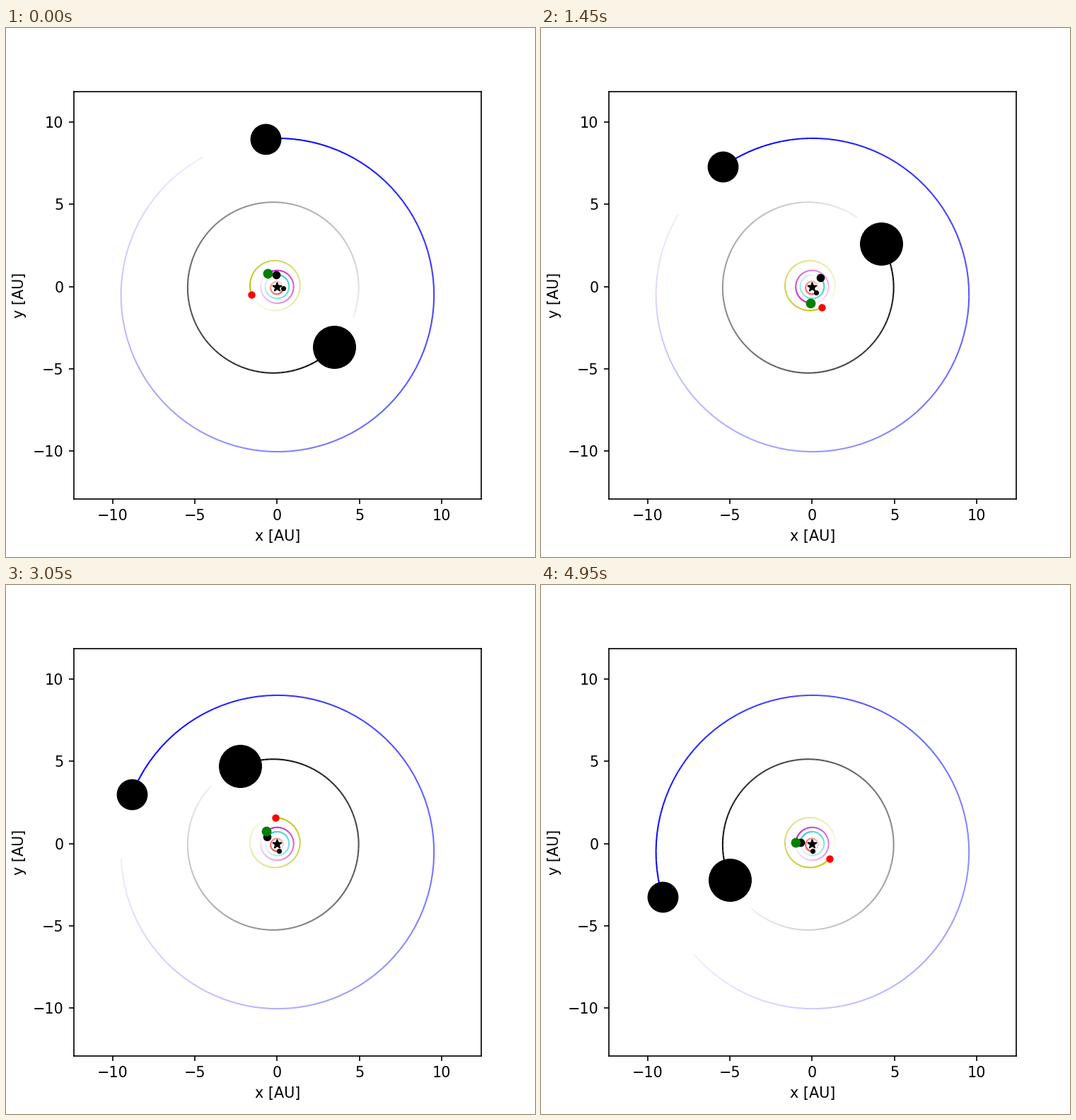
Write a matplotlib script that moves like this. It is 748 px wide and 748 px high and loops after 5 s.

```python
import numpy as np
import matplotlib.pyplot as plt
from matplotlib.animation import FuncAnimation
from matplotlib.collections import LineCollection
from matplotlib.colors import to_rgb

DPI = 149.6
FRAMES, INTERVAL = 100, 50
STEP_DAYS = 30
EARTH_RATE = np.radians(0.985608)    # mean motion per day at 1 AU
TAIL = 0.067                         # faintest part of the trail still drawn
TRAIL_POINTS = 100


class Planet:
    """Ellipse around the star: size, eccentricity, perihelion, first longitude."""

    def __init__(self, ax, a, e, peri, lon, trail, dot, diameter):
        self.a, self.e = a, e
        self.peri = np.radians(peri)
        self.start = np.radians(lon - peri)
        self.rate = EARTH_RATE / a ** 1.5    # Kepler's third law
        alpha = np.linspace(TAIL, 1, TRAIL_POINTS - 1)
        colors = [(*to_rgb(trail), f) for f in alpha]
        self.line = LineCollection([], colors=colors, linewidths=1, zorder=2)
        ax.add_collection(self.line, autolim=False)
        self.marker = ax.scatter([0], [0], s=(diameter * 72 / DPI) ** 2,
                                 color=dot, linewidths=0, zorder=3)

    def eccentric(self, day):
        """Solve Kepler's equation by Newton's method."""
        mean = self.start + self.rate * day
        ecc = mean + self.e * np.sin(mean)
        for _ in range(5):
            ecc -= (ecc - self.e * np.sin(ecc) - mean) / (1 - self.e * np.cos(ecc))
        return ecc

    def points(self, ecc):
        u = self.a * (np.cos(ecc) - self.e)
        v = self.a * np.sqrt(1 - self.e ** 2) * np.sin(ecc)
        c, s = np.cos(self.peri), np.sin(self.peri)
        return np.column_stack([c * u - s * v, s * u + c * v])

    def move(self, day):
        lag = np.linspace(2 * np.pi * (1 - TAIL), 0, TRAIL_POINTS)
        pts = self.points(self.eccentric(day) - lag)
        self.line.set_segments(np.stack([pts[:-1], pts[1:]], axis=1))
        self.marker.set_offsets(pts[-1:])


fig, ax = plt.subplots(figsize=(5, 5), dpi=DPI)
fig.subplots_adjust(left=0.1257, right=0.9007)
ax.set_aspect("equal")
ax.set_xlabel("x [AU]")
ax.set_ylabel("y [AU]")

half, cx, cy = 12.392, 0.022, -0.524
ax.set_xlim(cx - half, cx + half)
ax.set_ylim(cy - half, cy + half)

ax.scatter([0], [0], marker="*", s=35, color="k", zorder=3)
planets = [
    Planet(ax, 0.3871, 0.206, 77.5, 5.7, "r", "k", 7.2),
    Planet(ax, 0.72333, 0.007, 131.6, 94.9, "c", "k", 11.6),
    Planet(ax, 1, 0.017, 103, 126.1, "m", "g", 13.8),
    Planet(ax, 1.5237, 0.093, 336.2, 205.5, "y", "r", 10.4),
    Planet(ax, 5.203, 0.048, 14.8, 318.05, "k", "k", 61),
    Planet(ax, 9.537, 0.054, 92.5, 94.25, "b", "k", 43.8),
]


def update(frame):
    for planet in planets:
        planet.move(STEP_DAYS * frame)
    return [art for p in planets for art in (p.line, p.marker)]


anim = FuncAnimation(fig, update, frames=FRAMES, interval=INTERVAL,
                     repeat=True, repeat_delay=0, blit=False)
plt.show()
```
